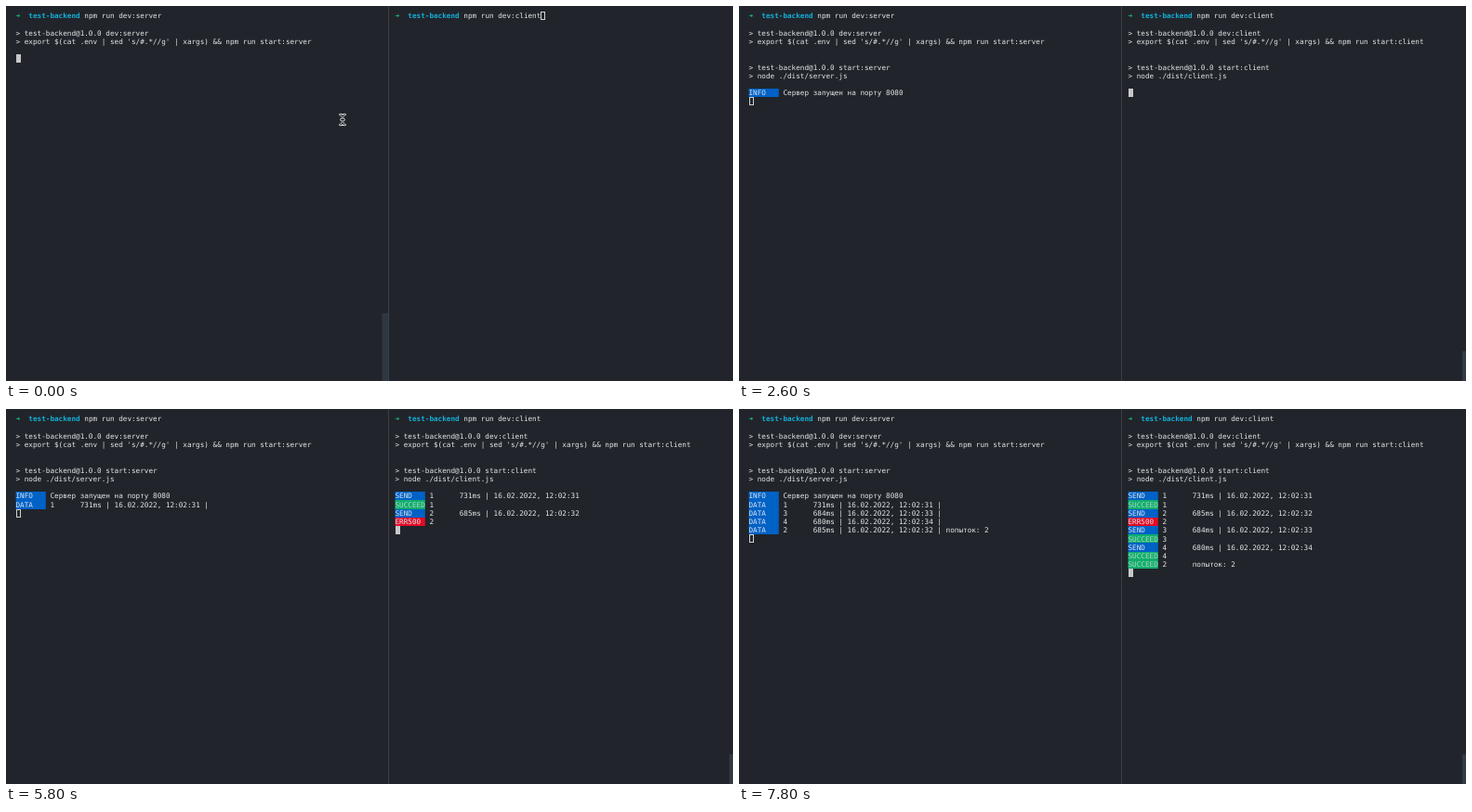
These frames come from a looping animation (782 by 404 pixels, 8 s). An HTML page with a canvas:

```html
<!DOCTYPE html>
<html lang="ru">
<head>
<meta charset="utf-8">
<title>Terminal</title>
<style>
  html, body { margin: 0; width: 100%; height: 100%; overflow: hidden; background: #21252b; }
  canvas { display: block; width: 782px; height: 404px; }
</style>
</head>
<body>
<canvas id="stage"></canvas>
<script>
const WIDTH = 782, HEIGHT = 404, LOOP = 8000, STEP = 200;
const CELL = 4.616, ROW = 9.23, TOP = 6, FONT_SIZE = 7.667;
const FAMILY = '"DejaVu Sans Mono", monospace';
const BLUE = '#0061c6', GREEN = '#0fae6c', RED = '#e30b24', TEXT = '#e6e6e6';
const TAGS = { INFO: BLUE, DATA: BLUE, SEND: BLUE, SUCCEED: GREEN, ERR500: RED };

const canvas = document.getElementById('stage');
const ctx = canvas.getContext('2d');
const scale = window.devicePixelRatio || 1;
canvas.width = WIDTH * scale;
canvas.height = HEIGHT * scale;

// Log rows are [time, tag, message]; they start at row 9.
const sent = (id, ms, sec) => `${id}      ${ms}ms | 16.02.2022, 12:02:${sec}`;
const requests = [[4600, 1, 731, 31], [5600, 2, 685, 32], [6400, 3, 684, 33], [7400, 4, 680, 34]];
const RETRY = 7600;

const server = {
  x: 10.5, name: 'server', enter: -1, intro: -1, start: 400,
  log: [
    [600, 'INFO', 'Сервер запущен на порту 8080'],
    ...requests.filter(r => r[1] !== 2).map(([t, ...r]) => [t, 'DATA', sent(...r) + ' |']),
    [RETRY, 'DATA', sent(2, 685, 32) + ' | попыток: 2']
  ]
};
const client = {
  x: 418.5, name: 'client', enter: 1600, intro: 1800, start: 2200,
  log: [
    ...requests.flatMap(([t, id, ms, sec]) => [
      [t, 'SEND', sent(id, ms, sec)],
      [t, id === 2 ? 'ERR500' : 'SUCCEED', String(id)]
    ]),
    [RETRY, 'SUCCEED', '2      попыток: 2']
  ]
};

function rect(x, y, w, h, color) {
  ctx.fillStyle = color;
  ctx.fillRect(x, y, w, h);
}

function print(pane, row, col, text, color = TEXT, weight = 'normal') {
  ctx.font = `${weight} ${FONT_SIZE}px ${FAMILY}`;
  ctx.fillStyle = color;
  ctx.fillText(text, pane.x + col * CELL, TOP + row * ROW + 7.3);
}

function drawCaret(pane, row, col, focused) {
  const x = Math.round(pane.x + col * CELL), y = Math.round(TOP + row * ROW);
  if (focused) return rect(x, y, 5, 9, '#c8c8c8');
  ctx.strokeStyle = '#d0d0d0';
  ctx.lineWidth = 1;
  ctx.strokeRect(x + 0.5, y + 0.5, 4, 8);
}

function drawPane(pane, t, focused) {
  const { name } = pane;
  print(pane, 0, 0, '➜', '#17c98a', 'bold');
  print(pane, 0, 3, 'test-backend', '#14afd9', 'bold');
  print(pane, 0, 16, `npm run dev:${name}`);
  let row = 0, col = 34;
  if (t >= pane.enter) [row, col] = [1, 0];
  if (t >= pane.intro) {
    print(pane, 2, 0, `> test-backend@1.0.0 dev:${name}`);
    print(pane, 3, 0, `> export $(cat .env | sed 's/#.*//g' | xargs) && npm run start:${name}`);
    row = 5;
  }
  if (t >= pane.start) {
    print(pane, 6, 0, `> test-backend@1.0.0 start:${name}`);
    print(pane, 7, 0, `> node ./dist/${name}.js`);
    row = 9;
  }
  for (const [time, tag, message] of pane.log) {
    if (t < time) break;
    const y = Math.round(TOP + row * ROW);
    rect(pane.x, y, 7 * CELL, Math.round(TOP + (row + 1) * ROW) - y, TAGS[tag]);
    print(pane, row, 0, tag, tag === 'SUCCEED' ? '#b4d8c8' : '#dce4ee');
    print(pane, row++, 8, message);
  }
  drawCaret(pane, row, col, focused);
}

function drawPointer(t) {
  const p = Math.min(1, Math.max(0, t / 1000));
  const ease = p * p * (3 - 2 * p);
  const x = 362 + 266.5 * ease, y = 122.5 - 34.5 * ease;
  const beam = new Path2D(
    'M-2.5 -5.5Q0 -5.5 0 -3.5Q0 -5.5 2.5 -5.5M0 -4V4' +
    'M-2.5 5.5Q0 5.5 0 3.5Q0 5.5 2.5 5.5M-1.5 0H1.5');
  ctx.save();
  ctx.translate(x, y);
  ctx.lineCap = 'round';
  for (const [color, width] of [['#eeeeee', 2.5], ['#15171a', 1]]) {
    ctx.strokeStyle = color;
    ctx.lineWidth = width;
    ctx.stroke(beam);
  }
  ctx.restore();
}

function draw(now) {
  const t = Math.floor((now % LOOP) / STEP) * STEP;
  ctx.setTransform(scale, 0, 0, scale, 0, 0);
  ctx.textRendering = 'geometricPrecision';
  rect(0, 0, WIDTH, HEIGHT, '#21252b');
  rect(411, 0, 1, HEIGHT, '#3c4046');
  if (t < 1600) rect(404.5, 331, 6.5, 73, '#2e3640');
  if (t >= 600) rect(778, 372, 4, 32, '#343a43');
  const clientFocused = t >= 1200;
  drawPane(server, t, !clientFocused);
  drawPane(client, t, clientFocused);
  if (t < client.enter) drawPointer(t);
}

const began = performance.now();
function tick() {
  draw(performance.now() - began);
  requestAnimationFrame(tick);
}
tick();
</script>
</body>
</html>
```
